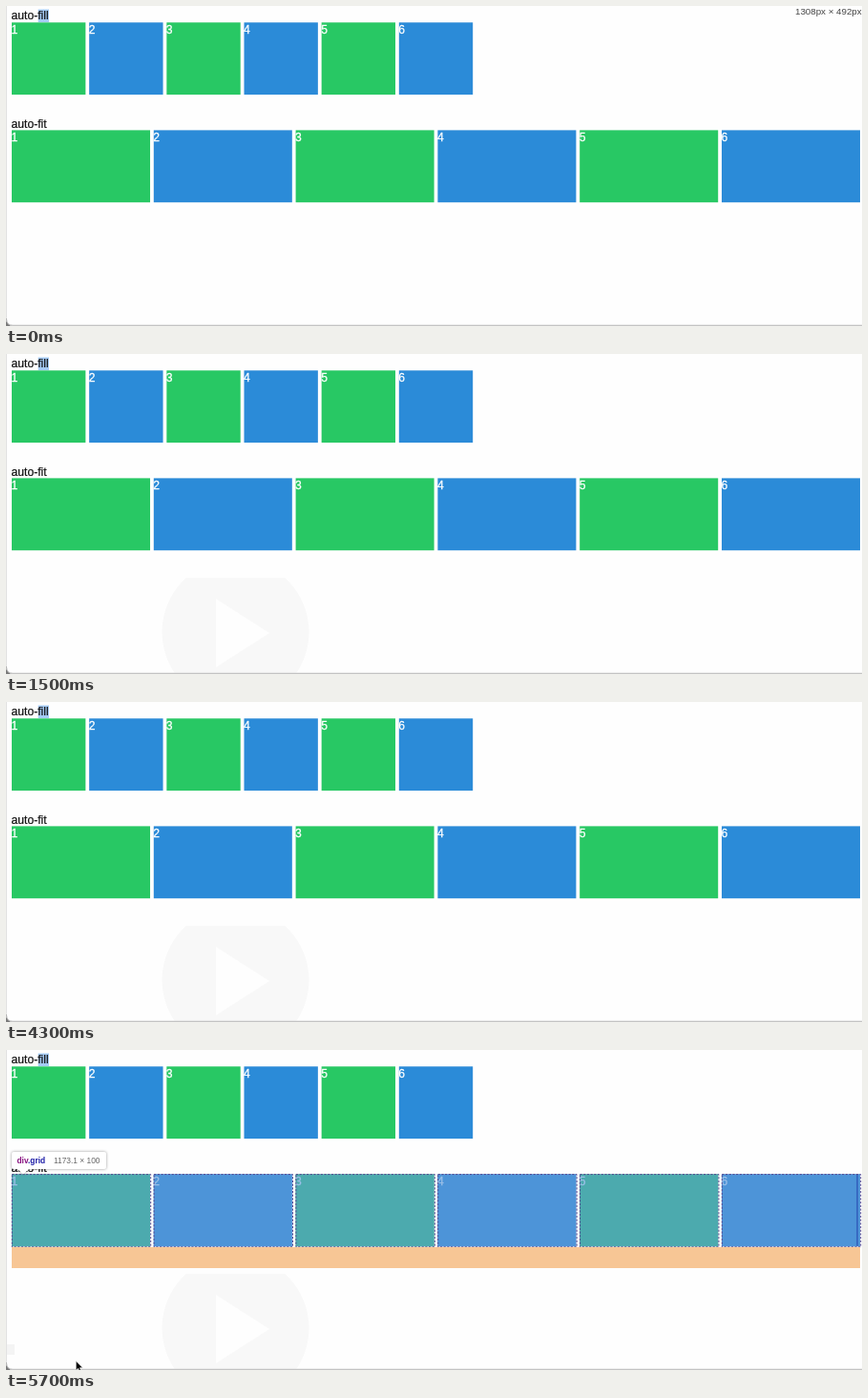
Recreate the animation shown at these times as an HTML page. Size 897 by 336 pixels, loop 5.8 s.

```html
<!DOCTYPE html>
<html lang="en">
<head>
<meta charset="utf-8">
<title>auto-fill and auto-fit</title>
<style>
  html, body { margin: 0; width: 100%; height: 100%; overflow: hidden; background: #fefefe; }
  svg { display: block; width: 897px; height: 336px; font: 12.13px "Liberation Sans", Arial, sans-serif; }
  .label { fill: #111; stroke: #111; stroke-width: .2; }
  .number { fill: #fff; stroke: #fff; stroke-width: .3; }
  .track { fill: none; stroke: #524590; stroke-width: 1; stroke-dasharray: 2.2 1.5; }
  .tip { font-size: 8.4px; }
  .tip .box { fill: #fff; filter: drop-shadow(0 .8px 1.5px rgba(0, 0, 0, .4)); }
  .name { font-weight: bold; }
</style>
</head>
<body>
<svg id="stage" viewBox="0 0 897 336"></svg>
<script>
const stage = document.getElementById('stage');
const LOOP = 5800, LEFT = 6, WIDTH = 889, GAP = 3.79, ROW = 75.8;
const OVERLAY = 'rgba(97,154,217,.63)';

function add(parent, tag, attrs = {}, text = '') {
  const node = document.createElementNS('http://www.w3.org/2000/svg', tag);
  for (const key in attrs) node.setAttribute(key, attrs[key]);
  node.textContent = text;
  return parent.appendChild(node);
}
const group = (attrs) => add(stage, 'g', attrs);
const rect = (parent, x, y, width, height, fill, extra) =>
  add(parent, 'rect', { x, y, width, height, fill, ...extra });

function tracks(count) {
  const width = (WIDTH - (count - 1) * GAP) / count;
  return Array.from({ length: count }, (_, i) => ({ x: LEFT + i * (width + GAP), width }));
}

function drawGrid(y, columns) {
  tracks(columns).slice(0, 6).forEach(({ x, width }, i) => {
    rect(stage, x, y, width, ROW, i % 2 ? '#2b8bd8' : '#28c864');
    add(stage, 'text', { x: x - .5, y: y + 11.5, class: 'number' }, i + 1);
  });
}

function drawOverlay(parent, y, columns) {
  for (const { x, width } of tracks(columns)) {
    rect(parent, x, y, width, ROW, OVERLAY);
    rect(parent, x + .3, y + .2, width + .4, ROW + .4, 'none', { class: 'track' });
  }
  rect(parent, LEFT, y + ROW + .8, WIDTH, 22, '#f7c695');
}

// The pointer sits above the box when up is true, otherwise below it.
function drawTip(parent, y, width, up, names, size, sizeX) {
  const tip = add(parent, 'g', { class: 'tip' });
  const arrow = up ? `M11.5 ${y + .3}L18 ${y - 5.5}L24.5 ${y + .3}Z`
                   : `M11.5 ${y + 17.7}L18 ${y + 23.5}L24.5 ${y + 17.7}Z`;
  const box = add(tip, 'g', { class: 'box' });
  rect(box, LEFT, y, width, 18, '#fff', { rx: 2 });
  add(box, 'path', { d: arrow });
  const name = add(tip, 'text', { x: 11.5, y: y + 12.3, class: 'name' });
  names.forEach((part, i) => add(name, 'tspan', { fill: i ? '#1a1aa6' : '#881280' }, part));
  add(tip, 'text', { x: sizeX, y: y + 12.3, fill: '#666' }, size);
}

// Page
rect(stage, 0, 0, 897, 336, '#fefefe');
rect(stage, 33.7, 3.5, 11.3, 13.5, '#a5cbf5');
add(stage, 'text', { x: 5.6, y: 14.4, class: 'label' }, 'auto-fill');
add(stage, 'text', { x: 5.6, y: 127.6, class: 'label' }, 'auto-fit');
drawGrid(17.3, 11);
drawGrid(130.4, 6);

const ruler = group({ 'font-size': 9.75 });
add(ruler, 'text', { x: 827, y: 9, fill: '#444' }, '1308px × 492px');

const ghost = group();
add(ghost, 'path', { d: 'M188.7 235H292.3A77 77 0 0 1 304.3 335H176.7A77 77 0 0 1 188.7 235Z', fill: '#f8f8f8' });
add(ghost, 'path', { d: 'M220 257L276 293L220 329Z', fill: '#fefefe' });

// Inspector highlights
const highlights = { fill: group(), fit: group(), text: group() };
drawOverlay(highlights.fill, 17.3, 11);
drawTip(highlights.fill, 121, 99, true, ['div', '.grid'], '1173.1 × 100', 50);
drawOverlay(highlights.fit, 130.4, 6);
rect(highlights.fit, 891.4, 131, 1.2, ROW - 1, '#2a50b4');
drawTip(highlights.fit, 107, 99, false, ['div', '.grid'], '1173.1 × 100', 50);
rect(highlights.text, 5.5, 3, 39.5, 14, OVERLAY);
drawTip(highlights.text, 23, 78, true, ['#text'], '56.72 × 21', 39);

const smudge = rect(stage, 0, 309, 9, 11, '#f4f4f4');

// Window edge
add(stage, 'path', { d: 'M0 329V336H7Q1 335.5 0 329Z', fill: '#777' });
add(stage, 'path', { d: 'M.5 0V329Q1 335.3 7 335.3H897', fill: 'none', stroke: '#b4b4b4', 'stroke-width': 1 });
rect(stage, 0, 0, 1, 328, '#e2e2e2');

const pointer = add(stage, 'path', {
  d: 'M73.3 326.6V336.4L75.6 334.3L77.2 338L78.9 337.2L77.4 333.7H80.4Z',
  fill: '#000', stroke: '#fff', 'stroke-width': .6
});

// Start time and highlighted element
const states = [[0, ''], [100, 'fill'], [700, ''], [1800, 'fill'], [2400, ''],
                [2800, 'fit'], [4000, ''], [4400, 'text'], [4600, 'fit']];
const show = (node, on) => { node.style.display = on ? '' : 'none'; };

function update(time) {
  const t = time % LOOP;
  const active = states.filter(([start]) => start <= t).pop()[1];
  for (const key in highlights) show(highlights[key], key === active);
  show(ruler, t < 100);
  show(ghost, t >= 100);
  show(smudge, t >= 4600);
  show(pointer, t >= 5700);
}

const begin = performance.now();
function tick() {
  update(performance.now() - begin);
  requestAnimationFrame(tick);
}
tick();
</script>
</body>
</html>
```
